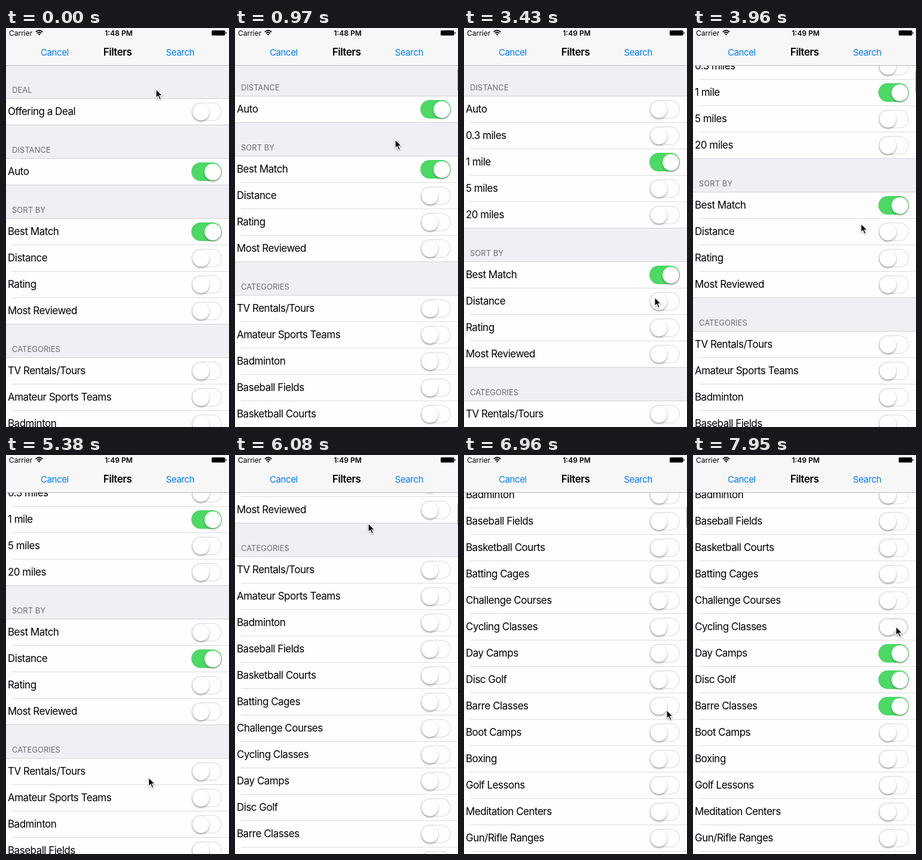
An HTML page that plays this animation: 373x665 px, repeating every 8 s.

```html
<!DOCTYPE html>
<html lang="en">
<head>
<meta charset="utf-8">
<title>Filters</title>
<style>
html, body { margin: 0; width: 100%; height: 100%; overflow: hidden; }
#stage { position: relative; width: 373px; height: 665px; overflow: hidden; background: #efeff4;
  font: 17px Inter, Roboto, sans-serif; letter-spacing: -.5px; color: #000; white-space: nowrap; }
#list { position: absolute; top: 62px; left: 0; width: 100%; }
.head { height: 56px; box-sizing: border-box; padding: 32px 0 0 10px; border-bottom: 1px solid #d2d1d6;
  font-size: 13px; line-height: 18px; letter-spacing: 0; color: #6d6d72; text-transform: uppercase; }
.row { position: relative; height: 44px; overflow: hidden; background: #fefefe; }
.row span { position: absolute; left: 3px; line-height: 43px; }
.row::after { content: ""; position: absolute; left: 10px; right: 0; bottom: 0; height: 1px; background: #dcdbe0; }
.row.last::after { left: 0; background: #d2d1d6; }
.switch { position: absolute; left: 310px; top: 6px; width: 51px; height: 31px; border-radius: 16px; background: #fefefe; }
.switch i { position: absolute; left: 1.5px; top: 1.5px; width: 28px; height: 28px; border-radius: 50%; background: #fff;
  box-shadow: 0 0 0 .5px rgba(0,0,0,.1), 0 2px 3px rgba(0,0,0,.3); }
#nav { position: absolute; top: 0; left: 0; width: 100%; height: 62px; background: #f7f7f7; border-bottom: 1px solid #b8b8bb; }
#nav > * { position: absolute; }
.status { top: 0; font-size: 12px; line-height: 17px; letter-spacing: 0; }
.title { left: 0; width: 100%; text-align: center; }
.bold { font-weight: 600; }
.bar { top: 30px; line-height: 21px; }
.link { font-size: 15px; letter-spacing: -.4px; color: #007aff; }
#thumb { position: absolute; left: 372px; width: 2.5px; height: 35px; background: #aaa; }
#cursor { position: absolute; left: 0; top: 0; overflow: visible; filter: drop-shadow(0 1px 1px rgba(0,0,0,.35)); }
</style>
</head>
<body>
<div id="stage">
  <div id="list"></div>
  <div id="thumb"></div>
  <div id="nav">
    <span class="status" style="left:5px">Carrier</span>
    <svg style="left:49px;top:3px" width="13" height="10" fill="none" stroke="#000" stroke-width="1.7">
      <path d="M.8 3.6Q6.5-1.6 12.2 3.6M2.9 5.9Q6.5 2.6 10.1 5.9"/>
      <path d="M4.5 7.4Q6.5 5.8 8.5 7.4L6.5 9.6Z" fill="#000" stroke="none"/>
    </svg>
    <span class="status title bold" id="clock" style="left:2px"></span>
    <svg style="left:344px;top:4px" width="26" height="9">
      <rect width="22.5" height="8.5" rx="1.5"/>
      <path d="M23.4 2.7Q25 3 25 4.3T23.4 5.9Z"/>
    </svg>
    <span class="bar link" style="left:58px">Cancel</span>
    <span class="bar title bold">Filters</span>
    <span class="bar link" style="left:267.5px">Search</span>
  </div>
  <svg id="cursor" width="12" height="19">
    <path d="M0 0V14.5L3.3 11.4 5.8 17.2 8.3 16.1 5.8 10.5H10.4Z" stroke="#fff" stroke-width="1.2"/>
  </svg>
</div>
<script>
const LOOP = 8000;
const $ = id => document.getElementById(id);

const sections = {
  'Deal': ['Offering a Deal'],
  'Distance': ['Auto', '0.3 miles', '1 mile', '5 miles', '20 miles'],
  'Sort by': ['Best Match', 'Distance', 'Rating', 'Most Reviewed'],
  'Categories': ['TV Rentals/Tours', 'Amateur Sports Teams', 'Badminton', 'Baseball Fields',
    'Basketball Courts', 'Batting Cages', 'Challenge Courses', 'Cycling Classes', 'Day Camps',
    'Disc Golf', 'Barre Classes', 'Boot Camps', 'Boxing', 'Golf Lessons', 'Meditation Centers',
    'Gun/Rifle Ranges', 'Gyms']
};

const clamp = v => Math.min(1, Math.max(0, v));
const linear = k => k;
const smooth = k => k * k * (3 - 2 * k);
const easeOut = k => 1 - (1 - k) ** 3;
const ramp = (t, start, length, ease = smooth) => ease(clamp((t - start) / length));
const mix = (a, b, k) => a + (b - a) * k;

// Scrolling: start, duration, distance, easing
const drags = [
  [400, 450, 104, easeOut],
  [3520, 440, 116, smooth],
  [5710, 370, 335, linear],
  [6080, 530, 214, easeOut]
];

// Pointer: start, duration, x, y
const moves = [
  [30, 340, 262, 300],
  [400, 400, 268, 186],
  [1400, 280, 348, 137],
  [2250, 310, 340, 222],
  [3050, 350, 319, 449],
  [3500, 440, 281, 326],
  [4100, 500, 338, 338],
  [5000, 500, 222, 571],
  [5690, 370, 223, 114],
  [6130, 470, 339, 425]
];

const startOn = ['Auto', 'Best Match'];
const taps = { 'Auto': 1700, '1 mile': 2600, 'Best Match': 4770, 'Distance': 4770 };

// The last taps climb the list one row at a time.
['Barre Classes', 'Disc Golf', 'Day Camps', 'Cycling Classes'].forEach((name, i) => {
  taps[name] = 7270 + 210 * i;
  moves.push([taps[name] - 150, 140, 339.5, 418 - 44 * i]);
});

function add(parent, tag, className, text = '') {
  const el = document.createElement(tag);
  el.className = className;
  el.textContent = text;
  return parent.appendChild(el);
}

const rows = [];
for (const [title, names] of Object.entries(sections)) {
  add($('list'), 'div', 'head', title);
  names.forEach((name, i) => {
    const el = add($('list'), 'div', i === names.length - 1 ? 'row last' : 'row');
    const label = add(el, 'span', '', name);
    const track = add(el, 'div', 'switch');
    rows.push({ name, el, label, track, knob: add(track, 'i', ''), extra: title === 'Distance' && i > 0 });
  });
}

function drawSwitch({ name, track, knob }, t) {
  const level = (delay, length) => {
    const k = name in taps ? ramp(t, taps[name] + delay, length) : 0;
    return startOn.includes(name) ? 1 - k : k;
  };
  const color = `color-mix(in srgb, #4cd964 ${100 * level(60, 140)}%, #e5e5e5)`;
  track.style.boxShadow = `inset 0 0 0 ${mix(1.5, 16, level(0, 200))}px ${color}`;
  knob.style.transform = `translateX(${20 * level(60, 200)}px)`;
}

function draw(t) {
  let scroll = 0, thumb = 0, x = 251, y = 102;
  for (const [start, length, distance, ease] of drags) {
    scroll += distance * ramp(t, start, length, ease);
    thumb = Math.max(thumb, ramp(t, start, 60) * (1 - ramp(t, start + length + 360, 250)));
  }
  for (const [start, length, toX, toY] of moves) {
    const k = ramp(t, start, length);
    x = mix(x, toX, k);
    y = mix(y, toY, k);
  }
  const open = ramp(t, 1992, 300);
  for (const row of rows) {
    drawSwitch(row, t);
    if (row.extra) {
      row.el.style.height = 44 * open + 'px';
      row.label.style.opacity = row.track.style.opacity = open;
    }
    if (row.name === 'Auto') row.el.classList.toggle('last', open === 0);
  }
  $('list').style.transform = `translateY(${-Math.round(scroll)}px)`;
  $('thumb').style.top = 66 + scroll * .0265 + 'px';
  $('thumb').style.opacity = thumb;
  $('cursor').style.transform = `translate(${x}px, ${y}px)`;
  $('clock').textContent = t < 2500 ? '1:48 PM' : '1:49 PM';
}

function tick() {
  draw(performance.now() % LOOP);
  requestAnimationFrame(tick);
}
tick();
</script>
</body>
</html>
```
